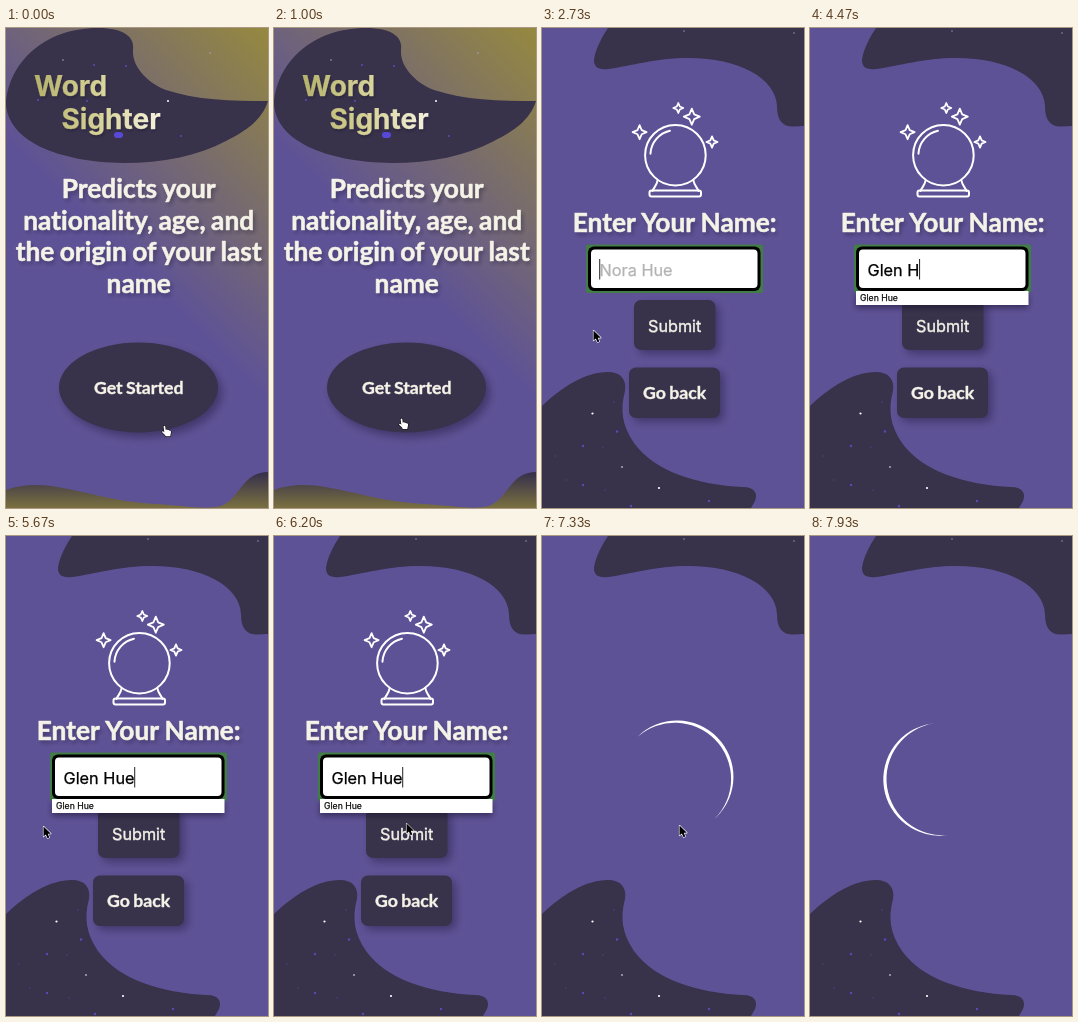
Animation of 262x480 px, one loop 8 s. Source, as an HTML page with a canvas:

```html
<!DOCTYPE html>
<html lang="en">
<head>
<meta charset="utf-8">
<title>Word Sighter</title>
<style>
  html, body { margin: 0; width: 100%; height: 100%; overflow: hidden; background: #5e5296; }
  canvas { display: block; width: 100vw; height: 100vh; }
</style>
</head>
<body>
<canvas id="stage"></canvas>
<script>
const W = 262, H = 480, LOOP = 8000;
const PURPLE = '#5e5296', DARK = '#38324b', CREAM = '#f5f2e8';
const LATO = 'Lato, sans-serif', INTER = 'Inter, sans-serif';
const TYPED = 'Glen Hue', HINT = 'Nora Hue';
const KEY_TIMES = [3470, 3670, 3930, 4070, 4270, 4470, 4600, 4730];
const FORM_AT = 1330, FOCUS_AT = 2270, LOAD_AT = 6670;

const canvas = document.getElementById('stage');
const dpr = window.devicePixelRatio || 1;
canvas.width = W * dpr;
canvas.height = H * dpr;
const ctx = canvas.getContext('2d');

function shadow(x, y, blur, alpha) {
  ctx.shadowOffsetX = x * dpr;
  ctx.shadowOffsetY = y * dpr;
  ctx.shadowBlur = blur * dpr;
  ctx.shadowColor = `rgba(20,14,40,${alpha})`;
}

function noShadow() { ctx.shadowColor = 'transparent'; }

// A hairline outline gives the text its slightly heavier smoothing.
function text(str, x, y, font, color, align = 'left', weight = .25) {
  ctx.font = font;
  ctx.fillStyle = ctx.strokeStyle = color;
  ctx.textAlign = align;
  ctx.lineWidth = weight;
  ctx.lineJoin = 'round';
  ctx.fillText(str, x, y);
  ctx.save();
  noShadow();
  ctx.strokeText(str, x, y);
  ctx.restore();
}

function lato(str, y, size) {
  ctx.letterSpacing = '0.01px'; // turns ligatures off
  ctx.wordSpacing = '-1px';
  text(str, 132.7, y, `700 ${size}px ${LATO}`, CREAM, 'center', size / 45);
  ctx.letterSpacing = ctx.wordSpacing = '0px';
}

function gradient(x0, y0, x1, y1, ...colors) {
  const g = ctx.createLinearGradient(x0, y0, x1, y1);
  colors.forEach((c, i) => g.addColorStop(i / (colors.length - 1), c));
  return g;
}

function fillPath(d, color) {
  ctx.fillStyle = color;
  ctx.fill(new Path2D(d));
}

function box(x, y, w, h, r, color) {
  ctx.beginPath();
  ctx.roundRect(x, y, w, h, r);
  ctx.fillStyle = color;
  ctx.fill();
}

function dots(points, color, r) {
  ctx.fillStyle = color;
  for (const [x, y] of points) {
    ctx.beginPath();
    ctx.arc(x, y, r, 0, 7);
    ctx.fill();
  }
}

function drawHome() {
  ctx.fillStyle = gradient(131, 240, 316.6, 54.4, PURPLE, '#96893f');
  ctx.fillRect(0, 0, W, H);

  fillPath('M0 76C2 36 37 0 92 0C118 0 129 9 127 22C126 38 140 54 160 62' +
    'C190 72 225 73 262 73C256 92 240 103 220 113' +
    'C192 128 156 135 118 135C50 134 2 112 0 76Z', DARK);
  dots([[32, 72], [88, 37], [120, 38], [81, 73], [175, 108]], '#5a4bc0', 1);
  dots([[57, 32], [204, 25]], '#aaa3cc', .8);
  dots([[162, 73]], '#fff', 1);
  box(108, 104, 9, 6, 3, '#5848d8');

  fillPath('M0 462C12 457 30 456 45 458C80 463 108 474 150 476' +
    'C180 478 200 482 215 478C235 470 236 444 262 444V480H0Z',
    gradient(0, 446, 0, 480, DARK, '#7a7040'));

  const title = `700 28px ${INTER}`;
  const gold = gradient(28, 0, 157, 0, '#b5b26c', '#d6d296', '#f6f3df');
  shadow(1, 2, 3, .4);
  text('Word', 28, 67.5, title, gold);
  text('Sighter', 55.5, 101, title, gold);

  shadow(2, 3, 4, .4);
  ['Predicts your', 'nationality, age, and', 'the origin of your last', 'name']
    .forEach((line, i) => lato(line, 170 + i * 31.7, 26.3));

  shadow(4, 5, 8, .4);
  ctx.beginPath();
  ctx.ellipse(132.5, 359.5, 79.5, 45, 0, 0, 7);
  ctx.fillStyle = DARK;
  ctx.fill();
  noShadow();
  lato('Get Started', 365.7, 17.7);
}

function drawBackdrop() {
  ctx.fillStyle = PURPLE;
  ctx.fillRect(0, 0, W, H);
  fillPath('M66 0C59 10 53 23 52 32C52 39 56 42 66 41C90 38 112 30 147 30' +
    'C196 30 234 50 235 78C235 92 240 99 252 98.5L262 98V0Z', DARK);
  fillPath('M0 378C20 359 43 344 66 344C79 344 85 352 83 363C78 382 80 397 92 415' +
    'C112 443 155 457 201 459C213 459 216 466 213 473L209 480H0Z', DARK);
  dots([[75, 403.5], [41, 418], [41, 457], [89, 478], [167, 473]], '#594bb8', 1.2);
  dots([[13, 428], [24, 452], [63, 462], [61, 419], [72, 374]], '#4c4388', .8);
  dots([[142, 3], [252, 5]], '#6c6690', 1);
  dots([[80, 439]], '#a6a2b4', 1.1);
  dots([[50.5, 385.5], [117, 460]], '#fff', 1.1);
}

function sparkle(x, y, r) {
  ctx.beginPath();
  for (let i = 0; i < 8; i++) {
    const a = i * Math.PI / 4, d = i % 2 ? r * .42 : r;
    ctx.lineTo(x + d * Math.cos(a), y + d * Math.sin(a));
  }
  ctx.closePath();
  ctx.stroke();
}

function drawBall() {
  ctx.strokeStyle = '#fff';
  ctx.lineWidth = 2;
  ctx.lineJoin = ctx.lineCap = 'round';
  ctx.stroke(new Path2D('M115.5 152.5C115 157 112 159 110.5 163M151.5 152.5C152 157 155 159 156.5 163'));
  ctx.beginPath();
  ctx.roundRect(107.5, 162.5, 51.5, 6, 2);
  ctx.stroke();
  ctx.beginPath();
  ctx.arc(133.4, 127.2, 30.3, 0, 7);
  ctx.stroke();
  ctx.beginPath();
  ctx.arc(133.4, 127.2, 25, Math.PI * 1.02, Math.PI * 1.43);
  ctx.stroke();

  ctx.lineWidth = 1.8;
  sparkle(136.3, 80, 5);
  sparkle(149.8, 88.7, 8);
  sparkle(97.6, 104.2, 7);
  sparkle(170, 114, 5.6);
}

function button(x, y, w, h) {
  shadow(4, 4, 8, .4);
  box(x, y, w, h, 7, DARK);
  noShadow();
}

function caretOn(t) {
  return t >= FOCUS_AT && !(t >= 2930 && t < 3470) && !(t >= 5000 && t < 5330);
}

function drawForm(t) {
  drawBall();
  shadow(2, 3, 4, .4);
  lato('Enter Your Name:', 204, 26.3);
  noShadow();

  button(92, 272, 81.5, 50);
  text('Submit', 132.7, 303.7, `16.2px ${INTER}`, CREAM, 'center', .4);
  button(87, 339.5, 91, 50.5);
  lato('Go back', 371, 17.7);

  if (t >= FOCUS_AT) box(44, 216.5, 177, 48.5, 2, '#417d45');
  box(46, 218.5, 172.5, 44.5, 6, '#000');
  box(49, 221.5, 166.5, 38.5, 4, '#fff');

  const count = KEY_TIMES.filter(k => t >= k).length;
  const value = TYPED.slice(0, count);
  const left = 57.5;
  text(value || HINT, left, 247.5, `16.3px ${INTER}`, count ? '#000' : '#b3b3b3');
  if (caretOn(t)) {
    const w = count ? ctx.measureText(value).width : 0;
    ctx.fillStyle = '#222';
    ctx.fillRect(left + w - .3, 231, 1, 20.5);
  }
  if (count) {
    shadow(0, 3, 6, .55);
    box(46, 263, 172.5, 14, 0, '#fff');
    noShadow();
    text(TYPED, 50, 273.3, `8.7px ${INTER}`, '#111');
  }
}

// Crescent: a disc minus the same disc shifted inward, turning once per second.
function drawLoader(t) {
  const start = LOAD_AT + 30;
  if (t < start) return;
  const r = 56.3, shift = 3.2, edge = Math.acos(-shift / 2 / r);
  ctx.save();
  ctx.translate(132.8, 243);
  ctx.rotate(Math.PI / 2 + (t - start) / 1000 * Math.PI * 2);
  ctx.beginPath();
  ctx.arc(shift, 0, r, -edge, edge);
  ctx.arc(0, 0, r, Math.PI - edge, edge - Math.PI, true);
  ctx.closePath();
  ctx.fillStyle = '#fff';
  ctx.fill();
  ctx.restore();
}

const POINTER_SHAPES = {
  arrow: ['M0 0V11.2L2.6 8.8L4.5 13L6.5 12.1L4.7 8.1H8.2Z', '#000', '#fff'],
  hand: ['M1.2 1.2C1.2 0 3 0 3.1 1.2L3.6 5C5 4.2 5.8 4.6 6 5.3C7.2 4.8 7.8 5.4 8 6' +
    'C9.2 5.8 9.6 6.6 9.4 7.8L8.6 12H3.6C2.8 10 .6 8.8 -.6 7.2C-.8 6 .8 5.8 2 7.4Z', '#fff', '#111'],
  beam: ['M-2 -7H2V-6H.6V6H2V7H-2V6H-.6V-6H-2Z', '#000', '#fff']
};

// time, x, y
const PATH = [
  [0, 156, 397], [470, 156, 397], [1270, 114, 387], [1800, 114, 387],
  [2200, 104, 240], [2300, 104, 240], [2600, 50, 293], [2730, 51, 302],
  [5530, 48, 299], [5670, 37, 290], [6250, 134, 287], [6330, 137, 289],
  [7500, 137, 289], [7860, 240, 312]
];

function pointerAt(t) {
  const i = PATH.findIndex(p => p[0] > t);
  const [t0, x0, y0] = PATH[i - 1], [t1, x1, y1] = PATH[i];
  const u = (t - t0) / (t1 - t0), e = u * u * (3 - 2 * u);
  return [x0 + (x1 - x0) * e, y0 + (y1 - y0) * e];
}

function drawPointer(t) {
  if ((t >= 3470 && t < 5530) || t >= 7860) return;
  const [x, y] = pointerAt(t);
  const inField = t < LOAD_AT && t > FORM_AT && y > 219 && y < 263 && x > 46 && x < 219;
  const overBack = t < 2200 && y > 339;
  const [d, fill, line] = POINTER_SHAPES[inField ? 'beam' : overBack ? 'hand' : 'arrow'];
  const shape = new Path2D(d);
  ctx.save();
  ctx.translate(x + .5, y + .5);
  ctx.scale(.9, .9);
  ctx.strokeStyle = line;
  ctx.lineWidth = 1.3;
  ctx.lineJoin = 'round';
  ctx.stroke(shape);
  ctx.fillStyle = fill;
  ctx.fill(shape);
  ctx.restore();
}

function draw(now) {
  const t = now % LOOP;
  ctx.setTransform(dpr, 0, 0, dpr, 0, 0);
  noShadow();
  if (t < FORM_AT) {
    drawHome();
  } else {
    drawBackdrop();
    if (t < LOAD_AT) drawForm(t);
    else drawLoader(t);
  }
  drawPointer(t);
}

const begin = performance.now();
function tick() {
  draw(performance.now() - begin);
  requestAnimationFrame(tick);
}
tick();
</script>
</body>
</html>
```
